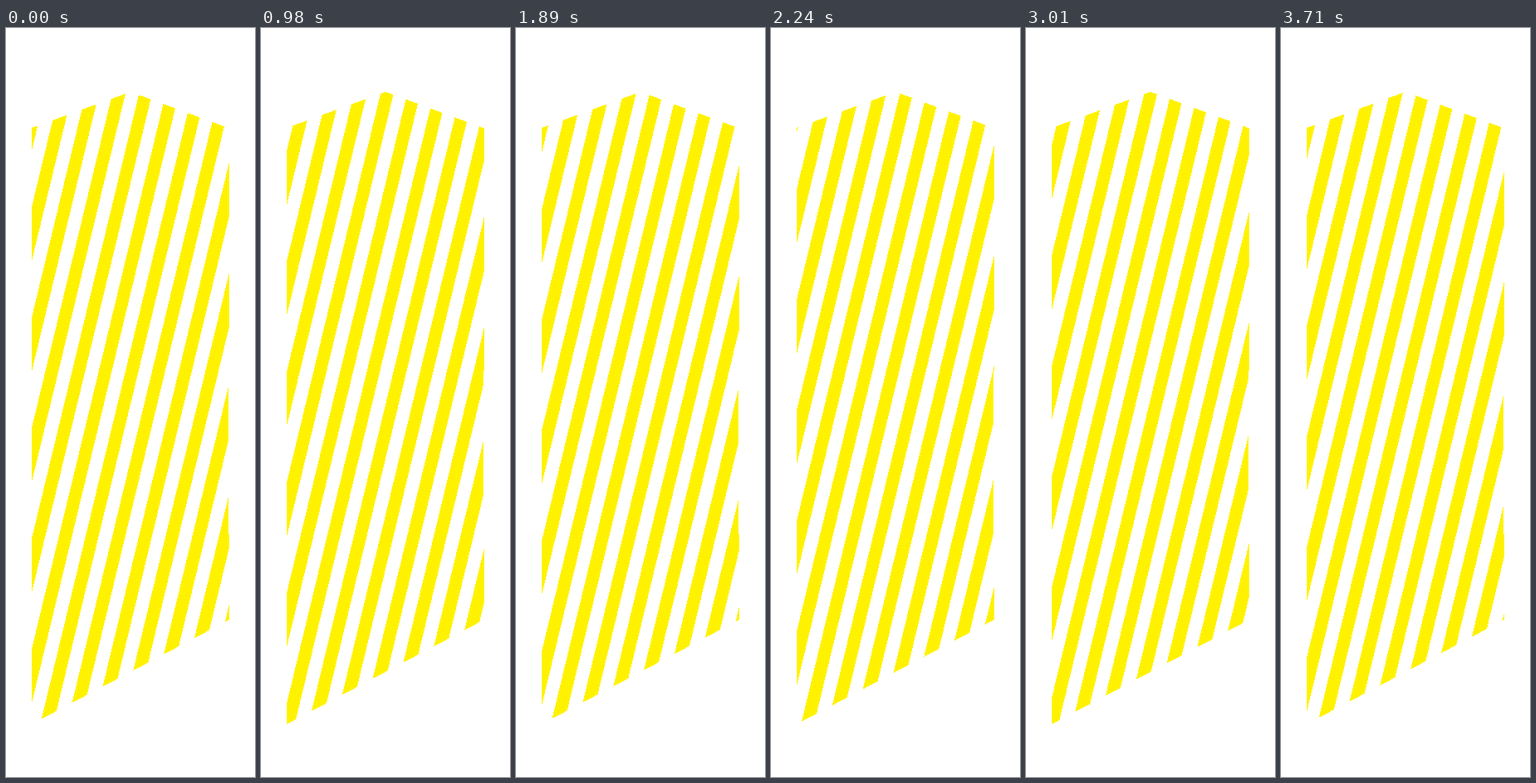
An HTML page for the animation above (3.78 s loop, 300 by 900 pixels).

```html
<!DOCTYPE html>
<html lang="en">
<head>
<meta charset="utf-8">
<title>Striped panel</title>
<style>
  html, body { margin: 0; width: 100%; height: 100%; overflow: hidden; background: #fff; }
  svg { display: block; width: 300px; height: 900px; shape-rendering: crispEdges; }
</style>
</head>
<body>
<svg viewBox="0 0 300 900">
  <!-- One wide dashed line, sheared so that its dashes become slanted stripes -->
  <line id="stripes" x1="150" y1="-52.7" x2="150" y2="1850"
        transform="matrix(1 -4.133 0 1 0 130.2)"
        stroke="#fff200" stroke-width="250" stroke-dasharray="65 67.8"/>
  <!-- White surround with the panel cut out -->
  <path fill="#fff" fill-rule="evenodd"
        d="M0 0H300V900H0Z M31 120L150 76.7L269 120.5V412H268V608H269V711L31 836.5Z"/>
</svg>
<script>
  const STEP_MS = 70;
  const STEPS = 54;
  const SHIFT = 4.81; // upward travel per step; the loop restarts with a small jump

  document.getElementById('stripes').animate(
    { strokeDashoffset: ['0px', `${SHIFT * STEPS}px`] },
    { duration: STEP_MS * STEPS, easing: `steps(${STEPS}, end)`, iterations: Infinity }
  );
</script>
</body>
</html>
```
